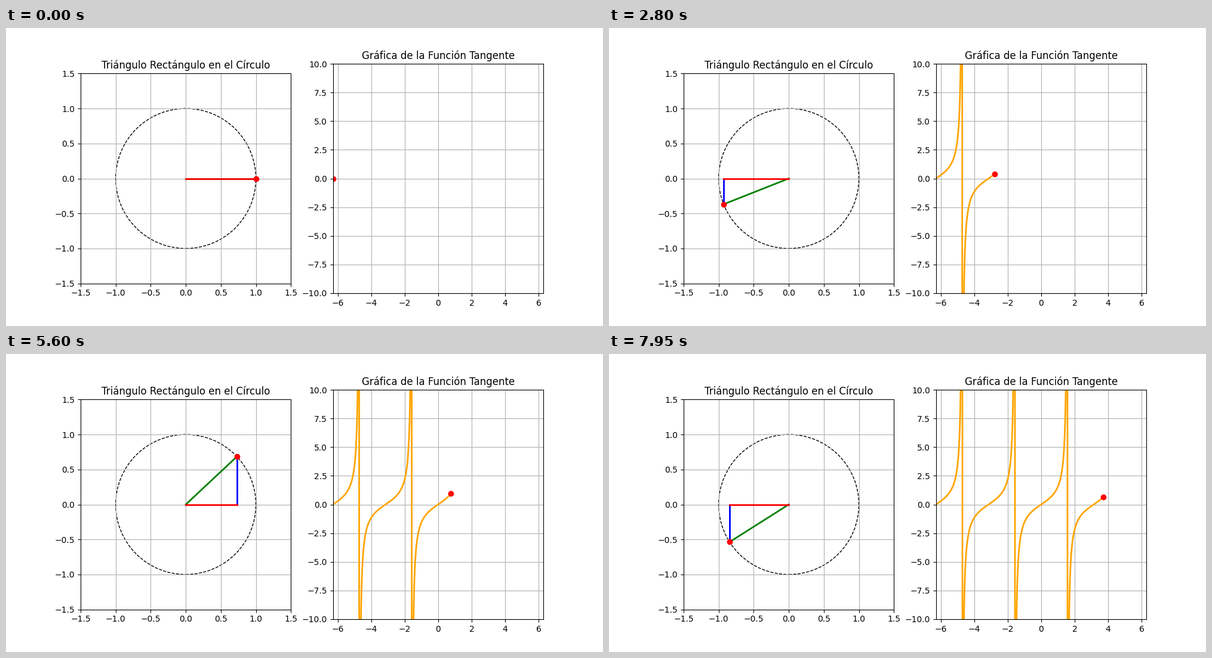
Recreate the animation shown at these times as a matplotlib script. Size 1000 px wide and 500 px high, loop 8000 ms.

```python
import numpy as np
import matplotlib.pyplot as plt
from matplotlib.animation import FuncAnimation

FRAMES = 160
INTERVAL = 50
START = -2 * np.pi
STEP = 4 * np.pi / 200

fig, (ax_circle, ax_tan) = plt.subplots(1, 2, figsize=(10, 5), dpi=100)

ax_circle.set_xlim(-1.5, 1.5)
ax_circle.set_ylim(-1.5, 1.5)
ax_circle.set_aspect("equal")
ax_circle.set_title("Triángulo Rectángulo en el Círculo")
ax_circle.grid(True)
ax_circle.add_patch(plt.Circle((0, 0), 1, fill=False, color="black", linestyle="--"))

ax_tan.set_xlim(-2 * np.pi, 2 * np.pi)
ax_tan.set_ylim(-10, 10)
ax_tan.set_title("Gráfica de la Función Tangente")
ax_tan.grid(True)

hypotenuse, = ax_circle.plot([], [], color="green", lw=2)
opposite, = ax_circle.plot([], [], color="blue", lw=2)
adjacent, = ax_circle.plot([], [], color="red", lw=2)
circle_dot, = ax_circle.plot([], [], "ro")
curve, = ax_tan.plot([], [], color="orange", lw=2)
tan_dot, = ax_tan.plot([], [], "ro")


def update(i):
    angle = START + i * STEP
    x, y = np.cos(angle), np.sin(angle)
    hypotenuse.set_data([0, x], [0, y])
    opposite.set_data([x, x], [0, y])
    adjacent.set_data([0, x], [0, 0])
    circle_dot.set_data([x], [y])

    angles = np.linspace(START, angle, 1000)
    curve.set_data(angles, np.tan(angles))
    tan_dot.set_data([angle], [np.tan(angle)])
    return hypotenuse, opposite, adjacent, circle_dot, curve, tan_dot


anim = FuncAnimation(fig, update, frames=FRAMES, interval=INTERVAL,
                     repeat=True, repeat_delay=0)
plt.show()
```
